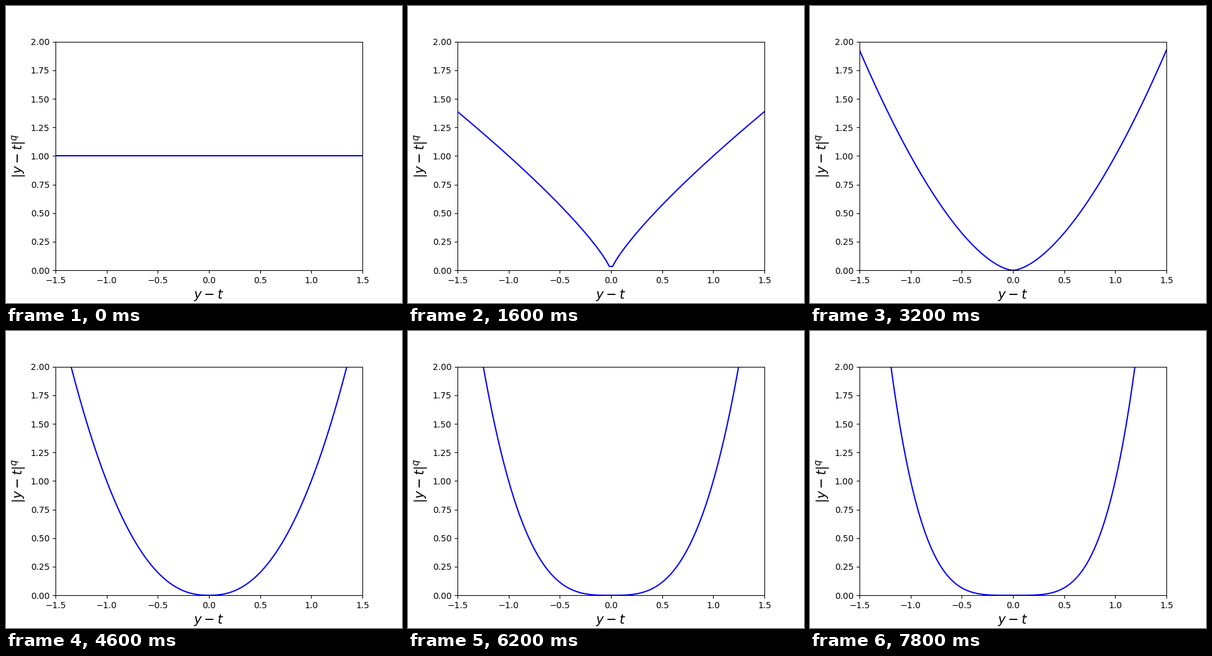
Write a matplotlib script that moves like this. It is 640 px wide and 480 px high and loops after 8000 ms.

```python
import numpy as np
import matplotlib.pyplot as plt
from matplotlib.animation import FuncAnimation

FRAMES = 40
INTERVAL = 200  # ms

y = np.linspace(-1.5, 1.5, 100)
powers = np.linspace(0, 10, 100)

fig, ax = plt.subplots(figsize=(6.4, 4.8), dpi=100)
ax.set_xlim(-1.5, 1.5)
ax.set_ylim(0, 2)
ax.set_xlabel(r"$y-t$", fontsize=15)
ax.set_ylabel(r"$|y-t|^q$", fontsize=15)
curve, = ax.plot([], [], color="blue", lw=1.5)


def update(i):
    curve.set_data(y, np.abs(y) ** powers[i])
    return curve,


anim = FuncAnimation(fig, update, frames=FRAMES, interval=INTERVAL,
                     repeat=True, repeat_delay=0)
plt.show()
```
